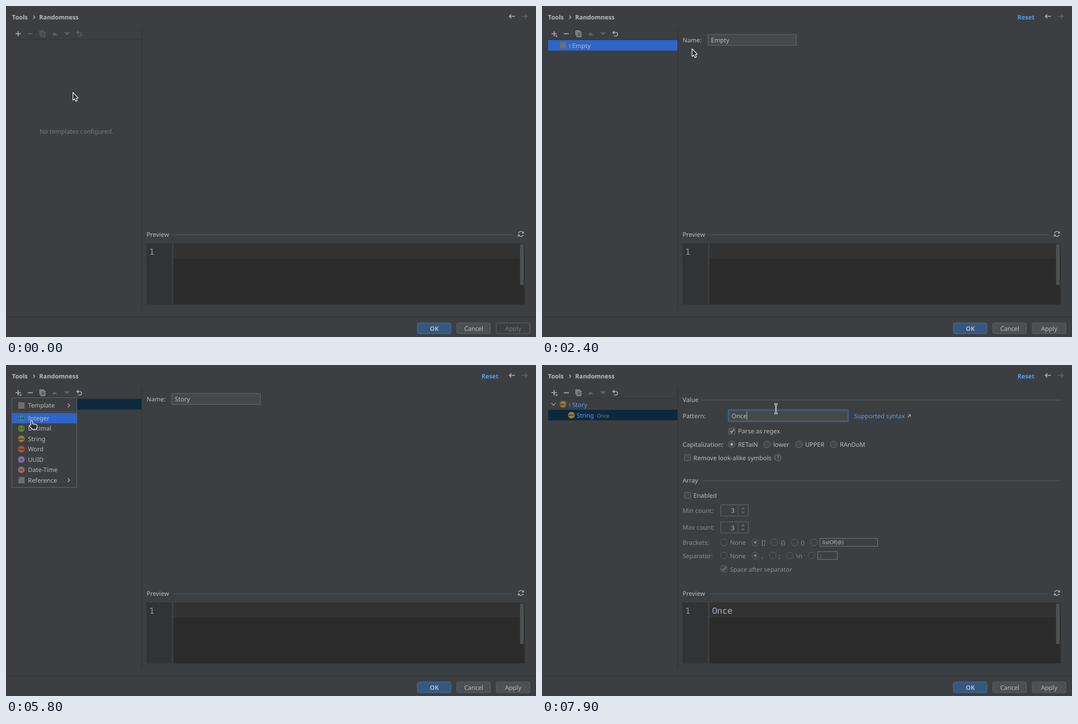
An HTML page for the animation above (8000 ms loop, 947 by 591 pixels).

```html
<!DOCTYPE html>
<html lang="en">
<head>
<meta charset="utf-8">
<title>Template settings</title>
<style>
html, body { margin: 0; width: 100%; height: 100%; overflow: hidden; background: #3c3f41; }
svg { display: block; }
text { font-family: "Noto Sans", sans-serif; font-size: 11px; text-rendering: geometricPrecision; white-space: pre; }
.mono { font-family: "Noto Sans Mono", monospace; font-size: 15.2px; }
</style>
</head>
<body>
<svg id="stage" width="947" height="591" viewBox="0 0 947 591"></svg>
<script>
const LOOP = 8000, STEP = 100;
const FG = '#bbbbbb', DIM = '#777777', MUTED = '#8c8c8c', ICON = '#afb1b3', OFF = '#616466';
const BLUE = '#2f65ca', LINK = '#589df6', NAVY = '#0d293e', BG = '#3c3f41';
const AMBER = '#b0833a', RUST = '#c4552d', GREY = '#6e6e6e';

// Drawing helpers
const rect = (x, y, w, h, fill, stroke = 'none', rx = 0, sw = 1) =>
  `<rect x="${x}" y="${y}" width="${w}" height="${h}" fill="${fill}" stroke="${stroke}" rx="${rx}" stroke-width="${sw}"/>`;
const line = (x1, y1, x2, y2, c, w = 1) =>
  `<path d="M${x1} ${y1}L${x2} ${y2}" stroke="${c}" stroke-width="${w}" fill="none"/>`;
const path = (d, fill, stroke = 'none', w = 1, extra = '') =>
  `<path d="${d}" fill="${fill}" stroke="${stroke}" stroke-width="${w}" ${extra}/>`;
const circle = (x, y, r, fill, stroke = 'none', w = 1) =>
  `<circle cx="${x}" cy="${y}" r="${r}" fill="${fill}" stroke="${stroke}" stroke-width="${w}"/>`;
// y is the middle of the capitals
const text = (s, x, y, c = FG, extra = '') =>
  `<text x="${x}" y="${y + 4}" fill="${c}" ${extra}>${s}</text>`;
const bold = 'font-weight="700"', mid = 'text-anchor="middle"';
const small = px => `style="font-size:${px}px"`;

const ruler = document.createElement('canvas').getContext('2d');
const widthOf = s => {
  ruler.font = '11px "Noto Sans", sans-serif';
  return ruler.measureText(s).width;
};

// Icons
const badge = (x, y, color, s) => circle(x, y, 6, color) +
  circle(x, y, 4.9, 'none', '#3c3f41', 0.5) +
  `<text x="${x}" y="${y + 1.9}" fill="#26282a" ${mid} ${bold} style="font-size:5.4px">${s}</text>`;
const square = (x, y) => rect(x - 5.7, y - 5.7, 11.4, 11.4, GREY);
const icons = {
  empty: square,
  int: (x, y) => badge(x, y, '#3f8aa8', '123'),
  dec: (x, y) => badge(x, y, '#648f3c', '4.2'),
  str: (x, y) => badge(x, y, AMBER, 'abc'),
  word: (x, y) => badge(x, y, RUST, 'cat'),
  uuid: (x, y) => badge(x, y, '#8d7cba', 'id'),
  date: (x, y) => badge(x, y, '#bd6b74', '23'),
  name: (x, y) => rect(x - 5.7, y - 5.7, 11.4, 11.4, RUST) +
    path(`M${x} ${y}V${y - 5.7}H${x + 5.7}V${y + 3}Z`, AMBER),
  lorem: (x, y) => rect(x - 5.7, y - 5.7, 11.4, 11.4, AMBER) +
    path(`M${x} ${y}L${x - 5.7} ${y - 5.7}V${y + 5.7}ZM${x} ${y}L${x + 5.7} ${y - 4}V${y + 5.7}Z`, RUST),
  ref: (x, y) => square(x, y) + path(`M${x - 6} ${y - 2}L${x - 2} ${y - 6}`, 'none', BG, 1.2)
};

// Popup menus: [label, icon, y]
const row = (list, y0) => list.map(([s, icon], i) => [s, icon, y0 + i * 18.43]);
const typesMenu = {
  w: 121, h: 192, rule: 0,
  rows: row([['Empty', 'empty'], ['Integer', 'int'], ['Decimal', 'dec'], ['String', 'str'], ['UUID', 'uuid'],
    ['Date-Time', 'date'], ['Hex color', 'str'], ['Name', 'name'], ['Lorem Ipsum', 'lorem'], ['IP address', 'int']], 72.3)
};
const partsMenu = {
  w: 116, h: 160, rule: 83.5,
  rows: [['Template', 'empty', 72.3]].concat(row([['Integer', 'int'], ['Decimal', 'dec'], ['String', 'str'],
    ['Word', 'word'], ['UUID', 'uuid'], ['Date-Time', 'date'], ['Reference', 'ref']], 95))
};

function popup(menu, picked, opacity, scale) {
  const { w, h, rule, rows } = menu, cx = 10.5 + w / 2, cy = 58.5 + h / 2;
  let s = rect(10.5, 58.5, w, h, BG, '#616466');
  rows.forEach(([label, icon, y], i) => {
    if (i === picked) s += rect(11, y - 9.2, w - 0.5, 18.4, BLUE);
    s += icons[icon](27.5, y) + text(label, 39.3, y);
    if (rule && (i === 0 || i === rows.length - 1))
      s += path(`M110.5 ${y - 3.6}l3.4 3.4l-3.4 3.4`, 'none', ICON, 1.2);
  });
  if (rule) s += line(12, rule, 125, rule, '#515355');
  return `<g opacity="${opacity}" transform="translate(${cx} ${cy}) scale(${scale}) translate(${-cx} ${-cy})">${s}</g>`;
}

// Pointer track: [ms, x, y]
const track = [[400, 119, 153.5], [700, 96, 128], [1000, 44, 72], [1200, 25, 53], [1300, 22.5, 50], [1600, 22.5, 50],
  [1800, 38, 70], [2000, 44, 74], [2100, 44, 74], [2200, 90, 77], [2400, 267.5, 75.5], [2600, 395, 63], [2800, 446, 57],
  [2900, 451, 57], [3000, 451, 57], [3200, 452, 62], [4400, 452, 62], [4600, 415, 67], [4800, 290, 68], [5000, 120, 60],
  [5200, 27, 51], [5300, 22.5, 50], [5600, 22.5, 50], [5800, 46, 99.5], [6000, 47, 130], [6100, 47, 134],
  [6200, 47, 134], [6400, 243.5, 91], [6600, 365, 86], [6800, 415, 88], [6900, 420, 88], [7000, 420, 88], [7100, 418, 78]];

function pointerAt(t) {
  let i = track.findIndex(k => k[0] > t);
  if (i === 0) return [track[0][1], track[0][2]];
  if (i < 0) return track[track.length - 1].slice(1);
  const a = track[i - 1], b = track[i], p = (t - a[0]) / (b[0] - a[0]);
  return [a[1] + (b[1] - a[1]) * p, a[2] + (b[2] - a[2]) * p];
}

const inside = (x, y, l, t, r, b) => x >= l && x <= r && y >= t && y <= b;

const pointers = {
  arrow: path('M.6 .8V14.6L3.7 12.2L5.6 16.6L8.3 15.4L6.6 11.3L10 10.6Z', '#2d3032', '#fff', 1.1, 'stroke-linejoin="round"'),
  hand: path('M-1.7 8V1.3A1.5 1.5 0 0 1 1.4 1.3V5.6L8.2 7Q10 7.6 9.7 9.6L8.5 15.2H1.2L-4.4 9.6Q-5 7.6-3.2 7.8Z',
    '#2d3032', '#fff', 1.1, 'stroke-linejoin="round"'),
  beam: path('M-3-8.2H3M0-8.2V8.2M-3 8.2H3', 'none', '#fff', 2.6) + path('M-2.4-8.2H2.4M0-8.2V8.2M-2.4 8.2H2.4', 'none', '#2d3032', 0.9),
  split: rect(-1.2, -7.5, 2.4, 15, '#2d3032', '#fff') +
    path('M2 0L6-3.2V-1.4H8V-3.2L11.6 0L8 3.2V1.4H6V3.2Z', '#2d3032', '#fff', 1)
};

// Form parts
const field = (x, y, w, h, focus) => rect(x, y, w, h, '#45494a', '#646667') +
  (focus ? rect(x - 0.5, y - 0.5, w + 1, h + 1, 'none', '#3d6590', 1.5, 2) : '');

function input(x, y, w, s, focus, selected) {
  const len = widthOf(s), cy = y + 10.3;
  return field(x, y, w, 19.5, focus) +
    (selected ? rect(x + 5.3, y + 2, len, 15.5, BLUE) : '') + text(s, x + 5.3, cy) +
    (focus && !selected ? line(x + 5.8 + len, y + 2, x + 5.8 + len, y + 17.5, FG, 0.9) : '');
}
const check = (x, y, on, c = ICON, border = '#6b6d6e') => rect(x - 5.4, y - 5.4, 10.8, 10.8, '#43474a', border, 1) +
  (on ? path(`M${x - 3} ${y}l2.3 2.8l4.2-5.8`, 'none', c, 1.5) : '');
const radio = (x, y, on, live) => circle(x, y, 6, live ? '#43494a' : BG, live ? '#6b6d6e' : '#5f6163') +
  (on ? circle(x, y, 2.4, live ? ICON : '#7d7f80') : '');
const radios = (y, list, live) => list.map(([x, s, on]) =>
  radio(x, y, on, live) + text(s, x + 11.2, y + 0.3, live ? FG : MUTED)).join('');
const heading = (s, x, y, to) => text(s, 251.3, y) + line(x, y + 0.3, to, y + 0.3, '#55585a');
const spinner = y => rect(319.5, y - 10, 49, 20, BG, '#646667') + line(350, y - 10, 350, y + 10, '#5a5c5e') +
  text('3', 344, y + 0.5, FG, 'text-anchor="end"') +
  path(`M355.5 ${y - 2}h7l-3.5-4zM355.5 ${y + 2}h7l-3.5 4z`, OFF);
const mini = (x, y, w, s) => rect(x, y - 7, w, 14, BG, '#76797b') + text(s, x + 4.5, y - 0.5, FG, small(9.5));

function stringForm(pattern, focus, selected) {
  return heading('Value', 285, 62.2, 927) + text('Pattern:', 251.3, 91) +
    input(333.5, 80.8, 213, pattern, focus, selected) +
    text('Supported syntax', 557.5, 91, LINK) + path('M653.5 93.5l4.2-4.2M654.3 88.7h4v4', 'none', ICON, 1.1) +
    check(339.5, 117.8, true) + text('Parse as regex', 350.3, 118.2) +
    text('Capitalization:', 251.3, 142) +
    radios(141.7, [[339, 'RETaiN', 1], [402, 'lower'], [459, 'UPPER'], [521, 'RAnDoM']], true) +
    check(260, 165.6, false) + text('Remove look-alike symbols', 270.6, 166.2) +
    circle(421.6, 165.7, 5.6, 'none', MUTED) + text('?', 421.6, 165.3, ICON, `${mid} ${small(9)}`) +
    heading('Array', 285, 206.3, 927) + check(260, 232.6, false) + text('Enabled', 270.6, 233) +
    text('Min count:', 251.3, 260, MUTED) + spinner(259.7) +
    text('Max count:', 251.3, 290.3, MUTED) + spinner(290) +
    text('Brackets:', 251.3, 317, MUTED) +
    radios(316.7, [[324.8, 'None'], [381, '[]', 1], [415.3, '{}'], [451.3, '()'], [485.7, '']]) + mini(496.5, 316.7, 103, 'listOf(@)') +
    text('Separator:', 251.3, 340.6, MUTED) +
    radios(340.3, [[324.8, 'None'], [381, ',', 1], [412, ';'], [442.8, '\\n'], [481.7, '']]) + mini(492.5, 340.3, 35, ';') +
    check(325, 364, true, '#7d7f80', '#5f6163') + text('Space after separator', 336, 364.6, MUTED);
}

function button(x, s, fill, border, c, weight = '') {
  return rect(x, 566, 60, 19, fill, border, 2) + text(s, x + 30.3, 575.8, c, `${mid} ${weight}`);
}

function toolbar(filled, hover) {
  const c = filled ? ICON : OFF;
  return (hover ? rect(13, 40.5, 18, 18, '#4c5052', 'none', 2) : '') +
    path('M17 49.5H26.4M21.7 44.8V54.2', 'none', ICON, 1.6) +
    (filled ? path('M23.4 52.7h5l-2.5 2.7z', ICON) : '') +
    line(39, 49.5, 48, 49.5, c, 1.6) +
    path('M60.5 52.5V44.3H67.5', 'none', c, 1.2) + rect(62.6, 46.4, 7, 8.2, 'none', c, 0, 1.2) +
    path('M64.2 49h4M64.2 51.8h4', 'none', c, 1) +
    path('M82 52.3h10l-5-5.3zM104 47h10l-5 5.3z', OFF) +
    path('M128.2 47.4H132a3.1 3.1 0 0 1 0 6.2H128.4', 'none', c, 1.4) + path('M125.4 47.4l4-3.6v7.2z', c);
}

function chrome(filled) {
  const half = 'M915.6 405.8A4.6 4.6 0 0 1 923.6 404.2';
  const head = 'M925.3 401.8V406H921.2Z';
  const arrows = path(half, 'none', ICON, 1.3) + path(head, ICON);
  return text('Tools', 10.8, 20, FG, bold) + path('M48.7 17l2.7 3l-2.7 3', 'none', FG, 1.2) +
    text('Randomness', 59.3, 20, FG, bold) +
    (filled ? text('Reset', 849.5, 20, LINK, bold) : '') +
    path('M909.3 18.5H899.5M903 14.8l-3.7 3.7l3.7 3.7', 'none', ICON, 1.5) +
    path('M921.2 18.5H931M927.5 14.8l3.7 3.7l-3.7 3.7', 'none', OFF, 1.5) +
    line(11, 60, 242, 60, '#303234') + line(242.5, 40, 242.5, 541, '#303234') +
    line(0, 555.5, 947, 555.5, '#313335') +
    heading('Preview', 298, 408.3, 905) + arrows + `<g transform="rotate(180 920 407)">${arrows}</g>` +
    rect(251, 424, 675.5, 109, '#2b2b2b') + rect(251, 424, 47, 109, '#313335') +
    rect(298, 424, 628.5, 27, '#323232') + line(298, 424, 298, 532, '#555555') +
    rect(918.5, 426, 6.5, 72, '#4f5051') + text('1', 256, 439.7, '#a4a3a3', 'class="mono"') +
    button(735, 'OK', '#365880', '#4c708c', FG, bold) + button(805.5, 'Cancel', '#4c5052', '#5e6060', FG) +
    button(876, 'Apply', filled ? '#4c5052' : 'none', '#5e6060', filled ? FG : DIM);
}

function tree(name, focused, nested, suffix) {
  const rowFill = focused ? BLUE : NAVY;
  let s = rect(11, nested ? 80 : 60.8, 231, 18.8, rowFill);
  s += (nested ? icons.str : square)(37.6, 70) +
    text('1', 47, 70.5, focused ? FG : MUTED, small(9)) + text(name, 54, 70.8, focused ? FG : LINK);
  if (nested) s += path('M17 68.2l3.6 3.6l3.6-3.6', 'none', ICON, 1.2) +
    icons.str(52.6, 89.4) + text('String', 61.8, 90, LINK) + text(suffix, 98, 89.7, '#7f8284', small(9));
  return s;
}

// Latest entry whose time has come
const latest = (t, list) => list.reduce((v, [at, s]) => t >= at ? s : v, '');

function menuAt(t, x, y) {
  const second = t >= 5400, menu = second ? partsMenu : typesMenu;
  const start = second ? 5400 : 1400, end = second ? 6300 : 2200;
  if (t < start || t >= end + 200) return '';
  if (t >= end) {
    const late = t >= end + 100;
    return popup(menu, second ? 3 : 0, late ? 0.27 : 0.65, late ? 0.845 : 0.93);
  }
  const age = (t - start) / STEP;
  const at = menu.rows.findIndex(r => Math.abs(r[2] - y) < 9.3);
  return popup(menu, Math.max(at, 0), [0.4, 0.85][age] || 1, [0.9, 0.98][age] || 1);
}

function pointerKind(t, x, y) {
  const menuOpen = (t >= 1400 && t < 2200) || (t >= 5400 && t < 6300);
  if (menuOpen && y > 58) return 'hand';
  if (t >= 6300 && Math.abs(x - 243) < 4) return 'split';
  if (t >= 2200 && t < 6300 && inside(x, y, 296, 50, 456, 71)) return 'beam';
  if (t >= 6300 && inside(x, y, 333, 76, 547, 101)) return 'beam';
  return 'arrow';
}

function scene(t) {
  const [x, y] = pointerAt(t);
  const filled = t >= 2200, nested = t >= 6300;
  const name = latest(t, [[2200, 'Empty'], [3400, 'S'], [3600, 'St'], [3700, 'Sto'], [3800, 'Stor'], [3900, 'Story']]);
  const typed = latest(t, [[7600, 'O'], [7800, 'Onc'], [7900, 'Once']]);
  let s = rect(0, 0, 947, 591, BG) + chrome(filled) + toolbar(filled, inside(x, y, 13, 40, 31, 58));
  if (filled) s += tree(name, t < 2900, nested, typed);
  else s += text('No templates configured.', 126, 224, DIM, mid);
  if (nested) {
    s += stringForm(typed || '[a-zA-Z0-9]{7,11}', t >= 6900, t >= 7100 && t < 7600) +
      text(typed || 'hoaoFFyAj', 304, 439.7, '#a9b7c6', 'class="mono"');
  } else if (filled) {
    s += text('Name:', 251.3, 61) +
      input(296.5, 50.8, 158, name, t >= 2900 && t < 5400, t >= 3100 && t < 3400);
  }
  s += menuAt(t, x, y);
  return s + `<g transform="translate(${x} ${y})">${pointers[pointerKind(t, x, y)]}</g>`;
}

const stage = document.getElementById('stage');
const begin = performance.now();
let shown = -1;
function tick() {
  const t = Math.floor(((performance.now() - begin) % LOOP) / STEP) * STEP;
  if (t !== shown) stage.innerHTML = scene(shown = t);
  requestAnimationFrame(tick);
}
tick();
</script>
</body>
</html>
```
